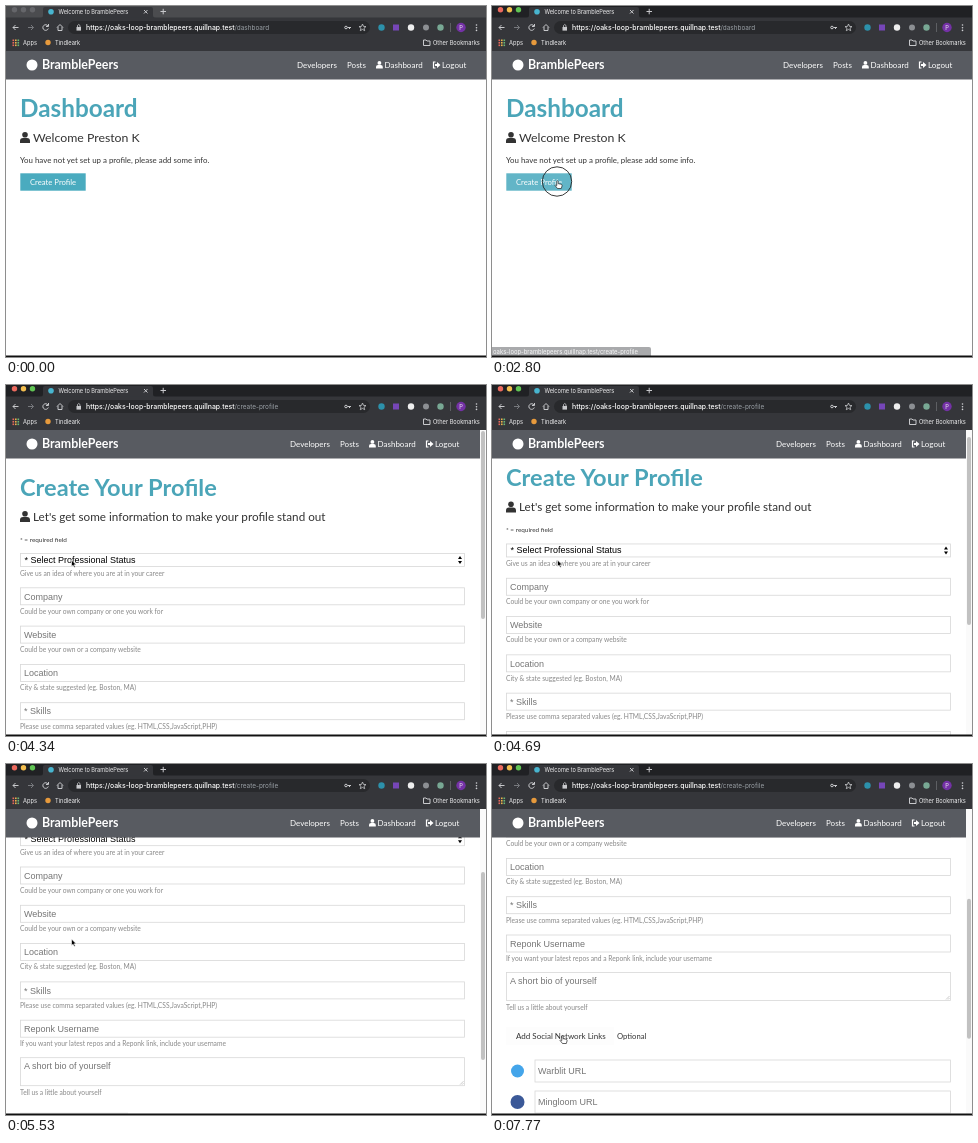
Recreate the animation shown at these times as an HTML page. Size 480x351 px, loop 8 s.

```html
<!DOCTYPE html>
<html lang="en">
<head>
<meta charset="utf-8">
<title>Profile walkthrough</title>
<style>
html, body { margin: 0; width: 100%; height: 100%; overflow: hidden; background: #fff; }
svg { display: block; width: 100vw; height: 100vh; }
text { font-family: Lato, sans-serif; font-size: 8px; fill: #333; }
.h1 { font-size: 23.6px; font-weight: 700; fill: #4ba5b8; }
.lead { font-size: 11.7px; }
.help { font-size: 6.7px; fill: #888; }
.ui { font: 5.7px Inter, sans-serif; fill: #f1f1f2; }
.hint { font: 9px "Liberation Sans", Arial, sans-serif; fill: #757575; }
.light, #nav text { fill: #fff; }
.box { fill: #fff; stroke: #d8d8d8; stroke-width: .8; }
.line { fill: none; stroke: #c8c9cc; stroke-width: 1; }
</style>
</head>
<body>
<svg viewBox="0 0 480 351" preserveAspectRatio="none">
  <defs>
    <g id="user"><circle cx="5" cy="2.8" r="2.8"/><path d="M0 11V9Q0 6 3 6H7Q10 6 10 9V11Z"/></g>
  </defs>
  <rect width="480" height="351" fill="#fff"/>

  <g id="dash">
    <text class="h1" style="font-size:24.3px" x="14" y="111">Dashboard</text>
    <use href="#user" x="14" y="126" fill="#333"/>
    <text class="lead" style="font-size:12.3px" x="27" y="136">Welcome Preston K</text>
    <text style="font-size:7.9px" x="14" y="156.7">You have not yet set up a profile, please add some info.</text>
    <rect id="create" x="14.3" y="167.3" width="65.4" height="17.4"/>
    <text class="light" style="font-size:7.7px" x="24" y="178.5">Create Profile</text>
  </g>

  <g id="form">
    <g id="page">
      <text class="h1" x="14" y="111">Create Your Profile</text>
      <use href="#user" x="14" y="126" fill="#333"/>
      <text class="lead" x="27" y="136">Let's get some information to make your profile stand out</text>
      <text style="font-size:6.4px" x="14" y="156.5">* = required field</text>
      <rect class="box" x="14.5" y="168.5" width="444" height="13"/>
      <text class="hint" style="fill:#000" x="18.5" y="178">* Select Professional Status</text>
      <path d="M452 174L454 171 456 174ZM452 176L454 179 456 176Z"/>
      <text class="help" x="14" y="190.5">Give us an idea of where you are at in your career</text>
      <g id="fields"></g>
      <rect class="box" x="14.5" y="393.5" width="444" height="28"/>
      <path class="line" style="stroke:#999;stroke-width:.5" d="M454 420.5L457.5 417M456 420.5L457.5 419"/>
      <text class="hint" x="18" y="405.3">A short bio of yourself</text>
      <text class="help" x="14" y="430.8">Tell us a little about yourself</text>
      <rect id="add" x="14" y="448" width="108" height="18"/>
      <text x="24" y="459.7">Add Social Network Links</text>
      <text x="125" y="459.7" style="font-size:7.7px">Optional</text>
      <g id="actions">
        <rect x="14" y="478" width="44" height="18" fill="#4aabbf"/>
        <text class="light" x="24" y="489.7">Submit</text>
        <rect x="62" y="478" width="49" height="18" fill="#f4f4f4"/>
        <text x="72" y="489.7">Go Back</text>
      </g>
      <g id="social">
        <circle cx="25.5" cy="492" r="6.5" fill="#44a5ea"/>
        <rect class="box" x="43" y="481" width="415.5" height="22"/>
        <text class="hint" x="46" y="495.2">Warblit URL</text>
        <circle cx="25.5" cy="523" r="7" fill="#3b5998"/>
        <rect class="box" x="43" y="512" width="415.5" height="22"/>
        <text class="hint" x="46" y="526.2">Mingloom URL</text>
      </g>
    </g>
  </g>

  <rect y="45" width="480" height="28.5" fill="#585b61"/>
  <circle cx="26" cy="59" r="5.5" fill="#fff"/>
  <text class="light" style="font-size:12.4px;font-weight:700" x="36" y="63">BramblePeers</text>
  <g id="nav" fill="#fff">
    <text x="291" y="62">Developers</text>
    <text x="341" y="62">Posts</text>
    <use href="#user" transform="translate(370 55) scale(.68)"/>
    <text x="378.5" y="62">Dashboard</text>
    <path d="M429.5 56H427.5V62H429.5" fill="none" stroke="#fff" stroke-width="1.2"/>
    <path d="M429 58H431V56L434.5 59 431 62V60H429Z"/>
    <text x="436" y="62">Logout</text>
  </g>
  <g id="scrollbar">
    <rect x="474" y="45" width="6" height="305" fill="#fafafa"/>
    <rect id="thumb" x="475" width="4" rx="2" fill="#c1c1c1"/>
  </g>

  <rect id="strip" width="480" height="12"/>
  <path d="M34 12Q37 12 37 9V3Q37 1 39 1H145Q147 1 147 3V9Q147 12 150 12Z" fill="#35363a"/>
  <rect y="11.5" width="480" height="33.5" fill="#35363a"/>
  <g id="lights"><circle cx="8.5" cy="3.7" r="2.7"/><circle cx="17.5" cy="3.7" r="2.7"/><circle cx="26.5" cy="3.7" r="2.7"/></g>
  <circle cx="45" cy="5.7" r="2.8" fill="#48b5cf"/>
  <text class="ui" style="font-size:5.6px" x="52.5" y="7.7">Welcome to BramblePeers</text>
  <path class="line" d="M138 4L141.5 7.5M141.5 4L138 7.5M154.5 5.5H160M157.2 2.8V8.3"/>
  <path class="line" d="M12.5 21.5H7M9.5 19L7 21.5 9.5 24M51 21.5L54 18.5 57 21.5M52 21V24.5H56V21M42 20A2.8 2.8 0 1 0 42.3 22.5M42.5 18V20.5H40"/>
  <path class="line" style="stroke:#77797d" d="M22 21.5H27.5M25 19L27.5 21.5 25 24"/>
  <rect x="62" y="15" width="302" height="13" rx="6.5" fill="#28292c"/>
  <rect x="70.5" y="21" width="4.5" height="3.6" fill="#c8c9cc"/>
  <path class="line" style="stroke-width:.8" d="M71.5 21V19.5Q72.7 17.5 74 19.5V21"/>
  <text class="ui" style="font-size:6.9px;font-weight:500;fill:#fff" x="80" y="23.8">https://oaks-loop-bramblepeers.quillnap.test<tspan id="path" font-size="6.4" font-weight="400" fill="#9aa0a6"></tspan></text>
  <path class="line" d="M341.5 21.5H345M343.5 21.5V23"/><circle class="line" cx="340" cy="21.5" r="1.3"/>
  <path class="line" style="stroke-width:.8" d="M356.5 18L357.5 20.4 360 20.6 358 22.2 358.7 24.7 356.5 23.4 354.3 24.7 355 22.2 353 20.6 355.5 20.4Z"/>
  <circle cx="375.5" cy="21.5" r="3.2" fill="#2c91ab"/>
  <rect x="387" y="18.5" width="6" height="6" fill="#7646b8"/>
  <circle cx="405" cy="21.5" r="3.2" fill="#eee"/>
  <circle cx="420" cy="21.5" r="3" fill="#8c8f93"/>
  <circle cx="434.5" cy="21.5" r="3.2" fill="#78a894"/>
  <path class="line" style="stroke:#5d5f63" d="M444.5 17V26"/>
  <circle cx="455" cy="21.5" r="4.7" fill="#7431a6"/>
  <text class="ui" x="453.2" y="23.5">P</text>
  <g fill="#d0d1d4"><circle cx="470.5" cy="19" r=".8"/><circle cx="470.5" cy="21.7" r=".8"/><circle cx="470.5" cy="24.4" r=".8"/></g>
  <g id="apps"></g>
  <text class="ui" x="17" y="38.5">Apps</text>
  <circle cx="42" cy="36.5" r="2.7" fill="#e79a3c"/>
  <text class="ui" x="49" y="38.5">Tindleark</text>
  <path class="line" d="M417.5 34H420L421 35H424V39.5H417.5Z"/>
  <text class="ui" x="427" y="38.5">Other Bookmarks</text>

  <g id="status">
    <path d="M0 341H157Q159 341 159 343V350H0Z" fill="#55575b"/>
    <text class="ui" style="font-size:5.9px" x="1" y="347.5">oaks-loop-bramblepeers.quillnap.test/create-profile</text>
  </g>
  <rect y="349.5" width="480" height="1.5" fill="#111"/>

  <circle id="ring" fill="none" stroke="#222" stroke-width=".9"/>
  <g id="cursor" stroke-linejoin="round">
    <path id="arrow" d="M0 0V6.5L1.6 5.2 2.7 7.6 3.8 7.1 2.7 4.8H4.7Z" fill="#000" stroke="#fff" stroke-width=".6"/>
    <path id="hand" d="M-.7 .3Q0 -.8 .7 .3V2.7L3.6 3.2Q4.7 3.5 4.6 4.8L3.8 7.5H0L-2.4 4.5Q-2.3 3.4 -.7 4.5Z" fill="#fff" stroke="#222" stroke-width=".7"/>
  </g>
</svg>
<script>
const $ = id => document.getElementById(id);
const show = (id, on) => $(id).style.display = on ? '' : 'none';
const set = (id, attrs) => { for (const k in attrs) $(id).setAttribute(k, attrs[k]); };
const ramp = (t, a, b) => Math.min(1, Math.max(0, (t - a) / (b - a)));
const smooth = (t, a, b) => { const u = ramp(t, a, b); return u * u * (3 - 2 * u); };

const LOOP = 8000, LIGHTS = 1470, FOCUS = 1680, HOVER = 2590, OPEN = 2940, EXPAND = 7700;
const clicks = [[1470, 1610, 1750], [2590, 2800, 3010], [7340, 7560, 7700]]; // press, release, gone

$('fields').innerHTML = [
  ['Company', 'Could be your own company or one you work for'],
  ['Website', 'Could be your own or a company website'],
  ['Location', 'City &amp; state suggested (eg. Boston, MA)'],
  ['* Skills', 'Please use comma separated values (eg. HTML,CSS,JavaScript,PHP)'],
  ['Reponk Username', 'If you want your latest repos and a Reponk link, include your username']
].map(([hint, help], i) => {
  const y = 211.3 + i * 38.3;
  return `<rect class="box" x="14.5" y="${y - 8.5}" width="444" height="17"/>
    <text class="hint" x="18" y="${y + 3.2}">${hint}</text>
    <text class="help" x="14" y="${y + 17.4}">${help}</text>`;
}).join('');

const dots = ['#e8685c', '#e9b44c', '#69b578'];
for (let i = 0; i < 9; i++)
  $('apps').innerHTML += `<rect x="${6.5 + i % 3 * 2.5}" y="${33.5 + (i / 3 | 0) * 2.5}" width="1.6" height="1.6" fill="${dots[i % 3]}"/>`;

function draw(t) {
  const opened = t >= OPEN, expanded = t >= EXPAND;
  show('dash', !opened);
  show('form', opened);
  show('scrollbar', opened);
  show('social', expanded);
  show('actions', !expanded);
  set('nav', { transform: `translate(${opened ? -7 : 0})` });
  $('path').textContent = opened ? '/create-profile' : '/dashboard';

  set('strip', { fill: t >= FOCUS ? '#202124' : '#4b4c4f' });
  ['#ec6a5e', '#f4bf4f', '#61c554'].forEach((c, i) =>
    $('lights').children[i].setAttribute('fill', t >= LIGHTS ? c : '#65666a'));

  const scroll = 19 * smooth(t, 4410, 4970) + 166 * (1 - (1 - ramp(t, 5250, 5950)) ** 1.3);
  set('page', { transform: `translate(0 ${-scroll})` });
  set('thumb', { y: 46 + scroll * (expanded ? .48 : .62), height: expanded ? 140 : 188 });

  const enter = smooth(t, 490, 1330), move = smooth(t, 6720, 7300);
  const x = 240 - 174.5 * enter + 5 * move, y = 353 - 178 * enter + 97 * move;
  const onCreate = t >= HOVER && !opened, onAdd = opened && y > 448 - scroll;
  set('cursor', { transform: `translate(${x} ${y})` });
  show('hand', onCreate || onAdd);
  show('arrow', !onCreate && !onAdd);
  set('create', { fill: onCreate ? '#62b5c7' : '#4aabbf' });
  set('add', { fill: onAdd ? '#fdfdfd' : '#f4f4f4' });

  const click = clicks.find(([a, , c]) => t >= a && t < c);
  show('ring', click);
  if (click) {
    const [press, release, gone] = click;
    set('ring', { cx: x - .5, cy: y + .5, r: .07 * (Math.min(t, release) - press), opacity: 1 - ramp(t, release, gone) });
  }
  set('status', { opacity: ramp(t, 2660, 2940) - ramp(t, 3220, 3430) });
}

function tick() {
  draw(performance.now() % LOOP);
  requestAnimationFrame(tick);
}
tick();
</script>
</body>
</html>
```
